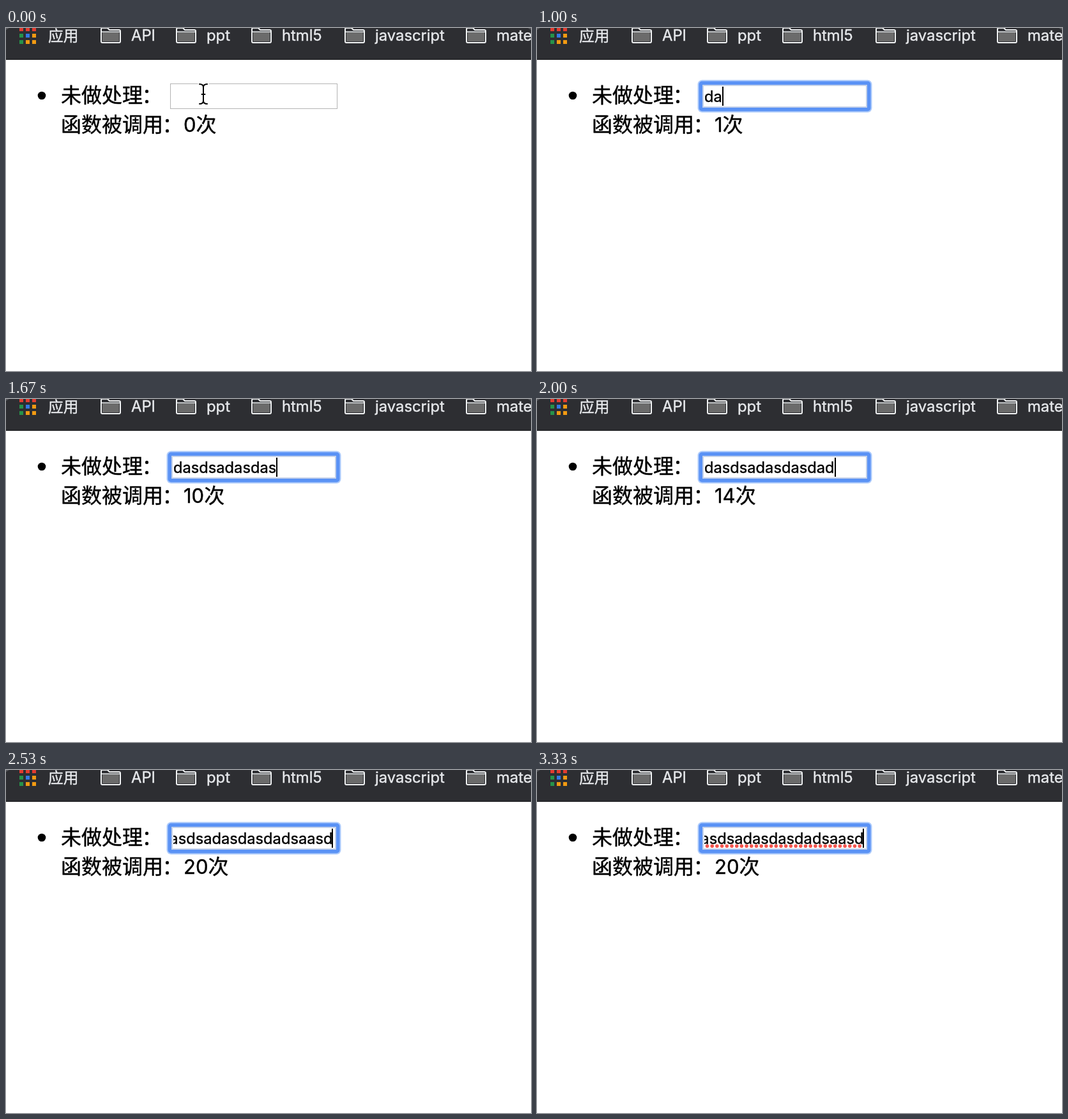
Recreate the animation shown at these times as an HTML page. Size 822 px wide and 538 px high, loop 3.59 s.

```html
<!DOCTYPE html>
<html lang="zh-CN">
<head>
<meta charset="utf-8">
<style>
html, body { margin: 0; width: 100%; height: 100%; overflow: hidden; background: #fff; }
svg { display: block; }
text { font: 32px Inter, "Noto Sans CJK SC", "Noto Sans CJK", sans-serif; stroke: #000; stroke-width: .4; }
#bar text { font-size: 23.8px; fill: #e8eaed; stroke: #e8eaed; }
#calls { font-size: 31px; }
#typed { font-size: 23.7px; }
</style>
</head>
<body>
<svg width="822" height="538" viewBox="0 0 822 538">
  <defs>
    <clipPath id="field"><rect x="262" y="90" width="251" height="34"/></clipPath>
    <g id="folder">
      <path d="M1 21V2Q1 0 3 0H11L14 3H29Q31 3 31 5V21Q31 23 29 23H3Q1 23 1 21Z" fill="#2d2e32" stroke="#f1f3f4" stroke-width="2"/>
      <path d="M3 7H29V21H3Z" fill="#6b6b6b"/>
      <path d="M1 6H31" stroke="#f1f3f4" stroke-width="1.5"/>
    </g>
    <path id="beam" d="M303 88Q309 88 309 93V114Q309 119 303 119M315 88Q309 88 309 93M309 114Q309 119 315 119M306.5 104H311.5"/>
  </defs>

  <g id="bar">
    <rect width="822" height="50" fill="#2d2e32"/>
    <rect y="48" width="822" height="2" fill="#27282b"/>
    <path d="M0 0H5L0 3ZM822 0H817L822 3Z" fill="#55565a"/>
    <text x="66" y="21">应用</text>
  </g>

  <circle cx="56" cy="106" r="6.3"/>
  <text x="86" y="117">未做处理<tspan dx="-1.5">：</tspan></text>
  <text x="86" y="163">函数被调用<tspan dx="-1.5">：</tspan></text>
  <text x="278" y="163"><tspan id="calls"></tspan>次</text>

  <rect id="plain" x="257.5" y="87.5" width="261" height="39" fill="#fff" stroke="#b4b4b4"/>
  <g id="focus">
    <rect x="251.5" y="81.5" width="273" height="51" rx="7" fill="#adcbfb"/>
    <rect x="253.5" y="83.5" width="269" height="47" rx="5" fill="#5a92f5"/>
    <rect x="259" y="89" width="258" height="36" fill="#c3d1ea"/>
    <rect x="261" y="91" width="254" height="32" fill="#fff"/>
  </g>

  <g clip-path="url(#field)">
    <path id="spelling" d="M266.5 119.3H512" stroke="#f4564f" stroke-width="5.6" stroke-linecap="round" stroke-dasharray="0 7.7"/>
    <text id="typed" y="116"></text>
  </g>
  <rect id="caret" y="92" width="2" height="30"/>

  <g id="pointer" fill="none" stroke-linecap="round">
    <use href="#beam" stroke="#fff" stroke-width="5"/>
    <use href="#beam" stroke="#000" stroke-width="2"/>
  </g>
</svg>
<script>
const LOOP = 3590, TICK = 1000 / 15;
const FOCUS = 70, TYPE = 870, REST = 2870, CHECK = 3330;
const PHRASE = 'dasdsadasdasdadsaasd';
const LEFT = 262, RIGHT = 511.5;
const KEYUP_LAG = 130;

// Typing rhythm: time and letters typed by then, linear in between.
const RHYTHM = [[780, 0], [1260, 6], [1660, 12], [2260, 19], [2330, 20]];

const $ = id => document.getElementById(id);
const show = (id, on) => $(id).setAttribute('visibility', on ? 'visible' : 'hidden');

function add(tag, attrs, text = '') {
  const el = document.createElementNS('http://www.w3.org/2000/svg', tag);
  for (const key in attrs) el.setAttribute(key, attrs[key]);
  el.textContent = text;
  $('bar').append(el);
}

const R = '#e23b30', G = '#26924a', B = '#3478e5', Y = '#f29a12';
[R, R, R, G, B, Y, G, Y, Y].forEach((fill, i) => add('rect', {
  x: 21 + i % 3 * 10, y: -1 + Math.floor(i / 3) * 10, width: 6, height: 6, fill
}));

[[148, 'API'], [266, 'ppt'], [384, 'html5'], [530, 'javascript'], [720, 'mate']].forEach(([x, name]) => {
  add('use', { href: '#folder', x });
  add('text', { x: x + 48, y: 20 }, name);
});

function lettersAt(t) {
  const next = RHYTHM.findIndex(([time]) => time > t);
  if (next < 0) return PHRASE.length;
  if (next === 0) return 0;
  const [t0, n0] = RHYTHM[next - 1], [t1, n1] = RHYTHM[next];
  return Math.floor(n0 + (n1 - n0) * (t - t0) / (t1 - t0));
}

function draw(t) {
  const now = Math.floor((t + 4) / TICK) * TICK;
  const letters = lettersAt(now);
  $('calls').textContent = lettersAt(now - KEYUP_LAG);

  const typed = $('typed');
  typed.textContent = PHRASE.slice(0, letters);
  const end = LEFT + (letters ? typed.getComputedTextLength() : 0);
  typed.setAttribute('x', LEFT - Math.max(0, end - RIGHT));
  $('caret').setAttribute('x', Math.min(Math.round(end), 510));

  const blink = t >= 530 && t < TYPE || t >= REST && t < CHECK;
  show('plain', t < FOCUS);
  show('focus', t >= FOCUS);
  show('pointer', t < TYPE);
  show('caret', t >= FOCUS && !blink);
  show('spelling', t >= CHECK);
}

const start = performance.now();
function tick() {
  draw((performance.now() - start) % LOOP);
  requestAnimationFrame(tick);
}
tick();
</script>
</body>
</html>
```
